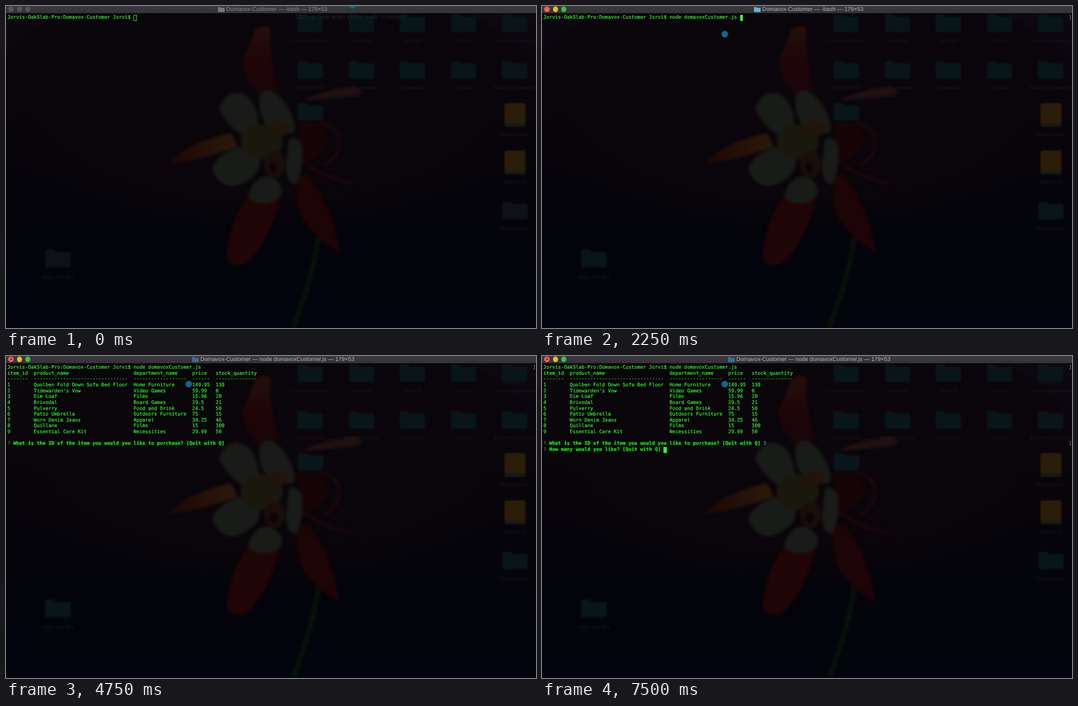
These frames come from a looping animation (960 by 584 pixels, 8 s). An HTML page:

```html
<!DOCTYPE html>
<html lang="en">
<head>
<meta charset="utf-8">
<title>Terminal shop</title>
<style>
  html, body { margin: 0; width: 100%; height: 100%; overflow: hidden; background: #03040a; }
  #stage { position: relative; width: 960px; height: 584px; overflow: hidden; }
  #desk { position: absolute; inset: 0; }
  #desk text { font: 9px "Liberation Sans", Arial, sans-serif; text-anchor: middle; fill: #1b171c; }
  #desk filter { color-interpolation-filters: sRGB; }

  #bar {
    position: absolute; left: 0; top: 0; width: 960px; height: 13px;
    background: linear-gradient(#3b3a3f, #333237); border-bottom: 1px solid #0b090d;
  }
  #bar i { position: absolute; top: 1.3px; width: 9.4px; height: 9.4px; border-radius: 50%; background: #58565b; }
  #bar.active .close { background: #ff5f57; }
  #bar.active .mini { background: #e5bf2f; }
  #bar.active .zoom { background: #3ac43c; }
  #bar.busy .close::after {
    content: ""; position: absolute; left: 3.2px; top: 3.2px;
    width: 3px; height: 3px; border-radius: 50%; background: #6b0a08;
  }
  #name {
    position: absolute; top: 0; height: 13px; white-space: pre; color: #8c8b8e;
    font: 10.25px/13px "Liberation Sans", Arial, sans-serif; text-rendering: geometricPrecision;
  }
  #bar.active #name { color: #b8b7ba; }
  #icon { position: absolute; top: 2px; width: 12px; height: 9px; fill: #77767a; }
  #bar.active #icon { fill: #5fb2dc; }
  #bar.busy #icon { fill: #3a6d8c; }

  #term {
    position: absolute; left: 2.5px; top: 16.1px; color: #2fff2f;
    font: 8.832px/10.64px "DejaVu Sans Mono", monospace; text-rendering: geometricPrecision;
    -webkit-text-stroke: .2px;
  }
  #term div { position: absolute; left: 0; top: 0; white-space: pre; }
  #term b { color: #12ff12; }
  #term .mark { color: #12a512; }
  #term .edge { color: #79817a; }
  #caret { width: 5.4px; height: 10.64px; background: #2fff2f; box-sizing: border-box; }
  #caret.hollow { background: none; border: 1px solid #2ae32a; }

  #hint {
    position: absolute; left: 524px; top: 14px; color: #262329; white-space: pre;
    font: 10.6px/13px "Liberation Sans", Arial, sans-serif; text-rendering: geometricPrecision;
  }
  #dot, #ring { position: absolute; border-radius: 50%; box-sizing: border-box; }
  #dot { width: 12.4px; height: 12.4px; margin: -6.2px; background: #0f688f; }
  #ring { left: 320.2px; top: 58.2px; width: 16px; height: 16px; border: 1.4px solid #1b5479; }
</style>
</head>
<body>
<div id="stage">
  <svg id="desk" viewBox="0 0 960 584" width="960" height="584">
    <defs>
      <linearGradient id="sky" x1="0" y1="0" x2="0" y2="1">
        <stop offset="0" stop-color="#0e0810"/>
        <stop offset=".45" stop-color="#07040a"/>
        <stop offset=".75" stop-color="#03040b"/>
        <stop offset="1" stop-color="#02050d"/>
      </linearGradient>
      <radialGradient id="glow" cx=".5" cy=".4" r=".5">
        <stop offset="0" stop-color="#0b060b"/>
        <stop offset=".8" stop-color="#09050a"/>
        <stop offset="1" stop-color="#09050a" stop-opacity="0"/>
      </radialGradient>
      <linearGradient id="tip" x1="0" y1="0" x2="0" y2="1">
        <stop offset="0" stop-color="#25100d"/>
        <stop offset=".5" stop-color="#1f0508"/>
        <stop offset="1" stop-color="#18050a"/>
      </linearGradient>
      <linearGradient id="side">
        <stop offset="0" stop-color="#1c0606"/>
        <stop offset="1" stop-color="#2c190a"/>
      </linearGradient>
      <filter id="soft" x="-20%" y="-20%" width="140%" height="140%"><feGaussianBlur stdDeviation="2.5"/></filter>
      <filter id="haze" x="-20%" y="-20%" width="140%" height="140%"><feGaussianBlur stdDeviation="1.7"/></filter>
    </defs>
    <rect width="960" height="584" fill="url(#sky)"/>
    <ellipse cx="470" cy="200" rx="520" ry="265" fill="url(#glow)"/>
    <g filter="url(#soft)">
      <path d="M566 420Q556 490 520 584" fill="none" stroke="#071309" stroke-width="9"/>
      <path d="M453 41Q470 32 479 42Q476 90 494 152L458 162Q426 125 429 98Z" fill="url(#tip)"/>
      <path d="M293 287Q330 246 408 231L420 255Q370 275 293 287Z" fill="url(#side)"/>
      <path d="M436 348Q404 395 399 455Q408 476 433 468Q478 430 496 345Z" fill="#1f0506"/>
      <path d="M527 305Q520 350 540 390Q570 432 604 445Q594 370 550 308Z" fill="#1d0406"/>
      <path d="M526 212Q570 200 585 238Q580 275 538 285Z" fill="#170407"/>
      <path d="M566 212C612 215 618 268 575 288M540 284Q580 312 628 322" fill="none" stroke="#1b070b" stroke-width="7"/>
      <path d="M538 172Q580 150 632 146Q650 152 640 162Q600 168 538 172Z" fill="#211012"/>
      <g fill="#191b18">
        <path d="M386 186Q396 156 420 157Q452 162 458 215L440 240Q404 226 386 186Z"/>
        <path d="M459 164Q470 146 489 158Q524 190 523 228Q500 240 474 222Q456 195 459 164Z"/>
        <path d="M374 293Q386 262 440 252Q468 270 456 300Q430 330 402 326Q378 318 374 293Z"/>
        <path d="M438 347Q446 312 472 308Q502 316 500 340Q490 360 455 358Z"/>
        <path d="M512 243Q528 230 537 256Q538 300 526 322Q510 326 507 292Z"/>
      </g>
      <ellipse cx="463" cy="247" rx="38" ry="32" fill="#1a180d"/>
      <ellipse cx="493" cy="222" rx="20" ry="14" fill="#20140b"/>
      <ellipse cx="487" cy="287" rx="19" ry="24" fill="#1a0e0a"/>
      <ellipse cx="484" cy="294" rx="8" ry="10" fill="#0e0406"/>
    </g>
    <g id="files" filter="url(#haze)"></g>
  </svg>

  <div id="hint">Click up here when you're ready to record!</div>

  <div id="term">
    <div id="prompt"></div>
    <div id="table"></div>
    <div id="ask"><span class="mark">?</span> <b>What is the ID of the item you would you like to purchase? [Quit with Q]</b> <span id="answer"></span></div>
    <div id="count"><span class="mark">?</span> <b>How many would you like? [Quit with Q]</b></div>
    <div id="caret"></div>
  </div>

  <div id="bar">
    <i class="close" style="left:4.4px"></i><i class="mini" style="left:19.6px"></i><i class="zoom" style="left:34.8px"></i>
    <svg id="icon" viewBox="0 0 12 9"><path d="M0 1Q0 0 1 0H4L5.2 1.3H11Q12 1.3 12 2.3V8Q12 9 11 9H1Q0 9 0 8Z"/></svg>
    <span id="name"></span>
  </div>
  <div id="ring"></div>
  <div id="dot"></div>
</div>

<script>
const $ = id => document.getElementById(id);
const LOOP = 8000, CELL = 5.317, ROW = 10.64;
const PROMPT = 'Jorvis-OakSlab-Pro:Domavox-Customer Jorvi$ ';
const COMMAND = 'node domavoxCustomer.js';

// Desktop icons behind the window
const folder = (x, y, cls = '') =>
  `<path class="${cls}" fill="#08161a" d="M${x - 23} ${y - 13}q0-3 3-3h12l4 4h24q3 0 3 3v22q0 3-3 3h-40q-3 0-3-3z"/>`;
const drive = (x, y) =>
  `<rect x="${x - 19}" y="${y - 21}" width="38" height="43" rx="4" fill="#2c1d09"/>` +
  `<rect x="${x - 19}" y="${y + 15}" width="38" height="7" rx="3" fill="#1c1914"/>`;
const label = (x, y, text) => `<text x="${x}" y="${y + 3}">${text}</text>`;

const columns = [551, 644, 736, 829, 921];
const top1 = ['Course work files', 'My notes', 'Old stuff', 'Pictures', 'Screen recordings'];
const top2 = ['Practice files', 'Class examples', 'Homework', 'Projects', 'Backup documents'];
$('files').innerHTML =
  columns.map((x, i) => folder(x, 31) + label(x, 63, top1[i]) + folder(x, 116) + label(x, 148, top2[i])).join('') +
  folder(552, 192) +
  drive(922, 197) + label(922, 233, 'Backup drive') +
  drive(922, 283) + label(922, 319, 'Data drive') +
  folder(922, 371, 'late') + label(922, 404, 'Shared items') +
  folder(94, 458, 'late') + label(94, 492, 'Notes and files');

// Product table
const widths = [9, 34, 20, 8, 14];
const line = cells => cells.map((c, i) => c.padEnd(widths[i])).join('');
const goods = [
  ['Quolben Fold Down Sofa Bed Floor', 'Home Furniture', '149.95', '138'],
  ["Tidewarden's Vow", 'Video Games', '59.99', '0'],
  ['Dim Loaf', 'Films', '15.96', '20'],
  ['Brixodal', 'Board Games', '29.5', '21'],
  ['Pulverry', 'Food and Drink', '24.5', '50'],
  ['Patio Umbrella', 'Outdoors Furniture', '75', '15'],
  ['Worn Denim Jeans', 'Apparel', '34.25', '46'],
  ['Quillane', 'Films', '15', '100'],
  ['Essential Care Kit', 'Necessities', '29.99', '50']
];
$('table').textContent = [
  line(['item_id', 'product_name', 'department_name', 'price', 'stock_quantity']),
  line([7, 32, 18, 6, 14].map(n => '-'.repeat(n))),
  ...goods.map((g, i) => line([String(i + 1), ...g]))
].join('\n');

const place = (el, col, row) => {
  el.style.left = col * CELL + 'px';
  el.style.top = row * ROW + 'px';
};
const show = (el, on) => { el.style.visibility = on ? 'visible' : 'hidden'; };

// Brackets at both window edges, one pair per entered line
const edges = [0, 13].map(row => [['[', -1], [']', 179]].map(([ch, col]) => {
  const el = document.createElement('div');
  el.className = 'edge';
  el.textContent = ch;
  place(el, col, row);
  $('term').append(el);
  return el;
}));

place($('table'), 0, 1);
place($('ask'), 0, 13);
place($('count'), 0, 14);

// Each step changes part of the state and keeps the rest
const steps = [
  [0, { dot: [627.5, -2.6], ring: 0, hint: true, active: false, busy: false, typed: 0, entered: 0,
        table: false, answer: '', count: false, caret: [43, 0], hollow: true }],
  [250, { dot: [333.5, 50.4], hint: false }],
  [500, { dot: [331.5, 50.7] }],
  [750, { dot: null, ring: 0.85, active: true, caret: null, hollow: false }],
  [1000, { ring: 1 }],
  [1250, { ring: 0.6, caret: [43, 0] }],
  [1500, { ring: 0, dot: [331.2, 50.8], typed: 2, caret: [45, 0] }],
  [1750, { typed: 5, caret: [48, 0] }],
  [2000, { typed: 7, caret: [50, 0] }],
  [2250, { typed: COMMAND.length, entered: 1, caret: [67, 0] }],
  [2500, { caret: [0, 1] }],
  [2750, { busy: true }],
  [3250, { table: true, caret: [75, 13] }],
  [4750, { caret: null }],
  [5250, { caret: [75, 13] }],
  [5750, { caret: null }],
  [6250, { caret: [75, 13] }],
  [6500, { answer: '5', caret: [76, 13] }],
  [7250, { entered: 2 }],
  [7500, { count: true, caret: [41, 14] }]
];
let last = {};
const states = steps.map(([, change]) => (last = { ...last, ...change }));

function draw(s) {
  show($('dot'), s.dot);
  if (s.dot) [$('dot').style.left, $('dot').style.top] = s.dot.map(v => v + 'px');
  $('ring').style.opacity = s.ring;
  show($('hint'), s.hint);

  $('bar').className = (s.active ? 'active ' : '') + (s.busy ? 'busy' : '');
  $('name').textContent = `Domavox-Customer — ${s.busy ? COMMAND : '-bash'} — 179×53`;
  const x = s.busy ? 337 : 384;
  $('icon').style.left = x + 'px';
  $('name').style.left = x + 15 + 'px';
  document.querySelectorAll('.late').forEach(f => f.setAttribute('fill', s.active ? '#08161a' : '#0e1216'));

  $('prompt').textContent = PROMPT + COMMAND.slice(0, s.typed);
  edges.forEach((pair, i) => pair.forEach(el => show(el, i < s.entered)));
  show($('table'), s.table);
  show($('ask'), s.table);
  show($('count'), s.count);
  $('answer').textContent = s.answer;
  $('answer').style.color = s.count ? '#19b5a5' : '';

  show($('caret'), s.caret);
  if (s.caret) place($('caret'), ...s.caret);
  $('caret').className = s.hollow ? 'hollow' : '';
}

const start = performance.now();
let current = -1;
function tick() {
  const t = (performance.now() - start) % LOOP;
  const i = steps.findLastIndex(([at]) => at <= t);
  if (i !== current) draw(states[current = i]);
  requestAnimationFrame(tick);
}
tick();
</script>
</body>
</html>
```
